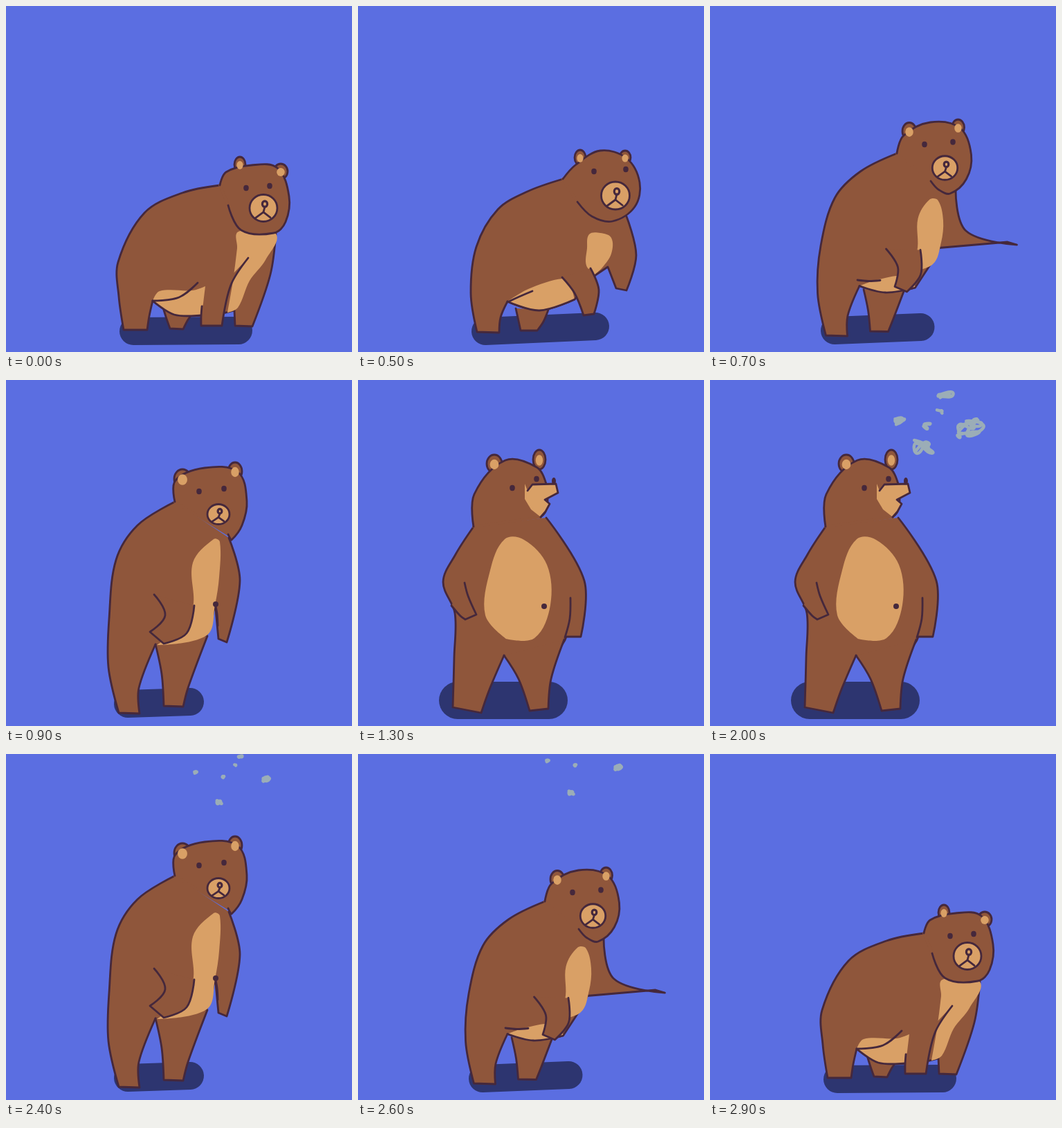
Animation, 500 px wide and 500 px high, one loop 3.4 s. Source, as an HTML page with a canvas:

```html
<!DOCTYPE html>
<html lang="en">
<head>
<meta charset="utf-8">
<title>Bear</title>
<style>
html, body { margin: 0; width: 100%; height: 100%; overflow: hidden; background: #5b6ee1; }
canvas { display: block; width: 100vw; height: 100vh; }
</style>
</head>
<body>
<canvas id="stage" width="500" height="500"></canvas>
<script>
const ctx = document.getElementById('stage').getContext('2d');
const LOOP = 3400, STEP = 100, MIRROR = 33;
const SKY = '#5b6ee1', FUR = '#8f563b', TAN = '#d9a066', INK = '#45283c', SHADE = '#2d3570', SMOKE = '#9badb7';

// Key points joined by smooth curves, except at these sharp ones.
const corners = { body: [5, 6, 8, 10, 11, 12, 13, 14], limb: [2, 3], chest: [5] };

const parse = pose => Object.fromEntries(Object.entries(pose).map(
  ([k, s]) => [k, s.split(' ').map(p => p.split(',').map(Number))]));

// Points are x,y; ears and muzzle are x,y,rx,ry; the shadow is a thick stroke x,y,width.
const crouch = parse({
  shadow: '184,470,40 336,469,40',
  body: '309,259 255,270 200,299 162,370 163,420 170,468 204,468 207,448 212,426 243,446 283,447 318,443 330,440 331,462 356,463 382,388 390,329',
  hind: '227,436 232,452 237,466 256,467 262,455 266,449',
  flank: '288,405 270,411 222,412',
  thigh: '212,426 250,421 277,400',
  chest: '336,326 389,328 375,367 352,397 335,436 320,443 328,397 334,350',
  arm: '283,434 282,448 282,462 312,462 325,403 350,364',
  head: '309,259 318,240 355,230 392,234 409,275 404,312 387,328 340,324 321,288',
  ears: '338,229,8,11 397,239,10,11',
  eyes: '347,263 381,260',
  muzzle: '372,292,20,19.5'
});
const lift = parse({
  shadow: '184,470,40 343,463,38',
  body: '296,250 245,268 202,294 171,348 163,415 172,471 204,472 206,450 216,427 262,440 313,424 343,389 361,377 373,408 388,411 402,360 388,304',
  hind: '228,437 232,455 235,469 259,469 268,456 275,439',
  flank: '308,403 296,394 246,409',
  thigh: '216,428 233,420 252,412',
  chest: '334,330 350,328 366,335 366,358 353,378 342,388 330,375 331,350',
  arm: '295,392 313,415 326,447 341,445 348,410 336,379',
  head: '296,250 314,230 350,209 388,220 407,255 400,290 368,311 338,304 317,283',
  ears: '321,219,8,11 386,219,8,10',
  eyes: '341,239 387,236',
  muzzle: '372,274,20.5,20'
});
const rise = parse({
  shadow: '176,468,40 266,465,40',
  body: '244,176 190,210 159,260 149,345 148,415 163,481 193,482 192,445 216,382 245,388 280,390 296,355 302,322 307,374 319,379 338,290 322,228',
  hind: '216,382 225,425 228,471 256,472 263,445 291,370',
  flank: '280,380 250,385 225,386',
  thigh: '210,364 225,375 240,381',
  chest: '300,230 309,234 308,285 302,325 290,369 218,383 268,335 270,264',
  arm: '214,310 230,340 208,364 228,381 261,366 272,326',
  head: '244,176 245,145 287,127 335,133 348,175 341,210 326,231 323,227 321,223',
  ears: '255,143,12,14 331,132,10,13',
  eyes: '279,161 315,157',
  muzzle: '307,194,16,14.5',
  sleeve: '302,322 305,338 306,355',
  navel: '303,324'
});
const stand = parse({
  shadow: '144,463,54 276,463,54',
  body: '167,212 141,252 123,292 140,337 139,400 137,473 178,481 190,447 211,398 230,404 280,408 289,392 299,376 301,371 322,371 327,290 272,199',
  hind: '211,398 232,432 248,478 275,475 279,432 298,375',
  chest: '212,230 240,231 273,267 278,325 255,373 214,374 184,340 191,275',
  arm: '154,293 159,312 171,339 155,346 148,341 135,326',
  head: '167,212 168,165 213,116 258,126 272,150 274,175 272,185 270,192 264,198',
  ears: '197,121,11,13 262,115,9,14',
  eyes: '223,156 258,143',
  muzzle: '262,166,22,18',
  sleeve: '307,315 306,345 299,372',
  navel: '269,327',
  snout: '245,160 252,151 286,150 289,163 270,173 277,179 271,190 264,198 250,187 241,172 241,150'
});

const lerp = (a, b, u) => a.map((v, i) => v + (b[i] - v) * u);

function morph(a, b, u) {
  const out = {};
  for (const k in { ...a, ...b }) {
    const p = a[k] ?? b[k], q = b[k] ?? a[k];
    out[k] = p.map((v, i) => lerp(v, q[i], u));
  }
  return out;
}

// The far paw swings forward on the way up.
function reach(pose, k) {
  const body = pose.body.map(([x, y], i) => i === 13 || i === 14 ? [x + 90 * k, y - 50 * k] : [x, y]);
  return { ...pose, body };
}

// The chest swells and the head lifts as the bear breathes in.
function inhale(pose, k) {
  const out = {};
  for (const key in pose) out[key] = key === 'shadow' ? pose[key] : pose[key].map(([x, y, ...r]) => {
    const swell = k * Math.exp(-(((y - 290) / 75) ** 2)) * (x < 220 ? 0.27 : 0.12);
    return [x + (x - 220) * swell, y - 21 * k * Math.max(0, 1 - (y - 100) / 330), ...r];
  });
  return out;
}

function poseAt(n) {
  if (n < 5) return crouch;
  if (n < 9) {
    const u = (n - 5) / 4;
    return reach(morph(lift, rise, u), Math.sin(u * Math.PI));
  }
  return n <= 13 ? morph(rise, stand, (n - 9) / 4) : inhale(stand, (n - 13) / 3);
}

// Smooth curve through points; a sharp point has no tangent.
function curve(pts, sharp = [], closed = false) {
  const n = pts.length, at = i => pts[(i + n) % n];
  const tangent = i => {
    i = (i + n) % n;
    if (sharp.includes(i) || (!closed && (i === 0 || i === n - 1))) return [0, 0];
    const dx = at(i + 1)[0] - at(i - 1)[0], dy = at(i + 1)[1] - at(i - 1)[1];
    const len = Math.hypot(dx, dy) || 1;
    return [dx / len, dy / len];
  };
  const path = new Path2D();
  path.moveTo(...pts[0]);
  for (let i = 0; i < (closed ? n : n - 1); i++) {
    const [x, y] = at(i), [u, v] = at(i + 1), d = Math.hypot(u - x, v - y) / 3;
    const p = tangent(i), q = tangent(i + 1);
    path.bezierCurveTo(x + p[0] * d, y + p[1] * d, u - q[0] * d, v - q[1] * d, u, v);
  }
  return path;
}

function polygon(pts) {
  const path = new Path2D();
  pts.forEach(p => path.lineTo(...p));
  return path;
}

function oval([x, y, rx, ry = rx]) {
  const path = new Path2D();
  path.ellipse(x, y, rx, ry, 0, 0, 2 * Math.PI);
  return path;
}

function fill(path, color) {
  ctx.fillStyle = color;
  ctx.fill(path);
}

function line(path, color = INK, width = 2.8) {
  ctx.strokeStyle = color;
  ctx.lineWidth = width;
  ctx.stroke(path);
}

function both(path, color) {
  fill(path, color);
  line(path);
}

function drawFace(p, side) {
  if (side) {
    fill(polygon(p.snout), TAN);
    line(polygon(p.snout.slice(0, 8)));
    const [x, y] = p.snout[2];
    fill(oval([x - 3, y - 4, 3, 5]), INK);
  } else {
    const [x, y, rx, ry] = p.muzzle[0];
    const lip = [x, y + ry * 0.3], nose = y - ry * 0.3;
    both(oval(p.muzzle[0]), TAN);
    line(oval([x + 2, nose, rx * 0.18, ry * 0.22]), INK, 3.2);
    line(polygon([[x + 2, nose + 4], lip, [x - rx * 0.6, y + ry * 0.75]]));
    line(polygon([lip, [x + rx * 0.5, y + ry * 0.7]]));
  }
  for (const [x, y] of p.eyes) fill(oval([x, y, 3.8, 4.2]), INK);
}

function drawBear(p, n) {
  const low = n < 9;
  line(polygon(p.shadow), SHADE, p.shadow[0][2]);
  both(curve(p.body, corners.body), FUR);
  both(curve(p.hind, corners.limb), FUR);
  if (low) {
    const hem = p.body.slice(8, 11);
    fill(curve([...hem, ...p.flank], [0, 2, 3], true), TAN);
    line(curve(hem));
    line(curve(p.thigh));
  }
  fill(curve(p.chest, corners.chest, true), TAN);
  both(curve(p.arm, corners.limb), FUR);
  if (!low) {
    line(curve(p.sleeve));
    fill(oval([...p.navel[0], 4]), INK);
  }
  for (const ear of p.ears) both(oval(ear), FUR);
  const head = curve(p.head);
  const join = polygon([p.head[0], p.head.at(-1)]);
  fill(head, FUR);
  line(join, FUR, 4);
  line(head);
  for (const [x, y, rx, ry] of p.ears) fill(oval([x, y + 1, rx * 0.58, ry * 0.55]), TAN);
  drawFace(p, n > 11);
}

// Smoke puffs at their fullest: x, y, width, height.
const puffs = [[274, 60, 15, 9], [308, 97, 27, 20], [314, 67, 13, 12], [331, 47, 12, 8], [338, 24, 28, 8], [376, 70, 38, 26]];

function random(seed) {
  return () => (seed = (seed * 16807) % 2147483647) / 2147483647;
}

function scribble(w, h, seed) {
  const rnd = random(seed * 7919 + 11);
  const count = Math.round(4 + w * h / 70);
  return Array.from({ length: count }, () => [(rnd() - 0.5) * w, (rnd() - 0.5) * h]);
}

function drawSmoke(step) {
  if (step < 17 || step > 28) return;
  const out = Math.min(1, (step - 16) / 4), drift = Math.max(0, (step - 20) / 4);
  const size = out * Math.max(0.25, 1 - 0.75 * drift);
  puffs.forEach(([px, py, w, h], i) => {
    const high = py + (py * py / 135 - py) * drift;
    const [x, y] = lerp([290, 140], [px, high], 1 - (1 - out) ** 2);
    if (y < 4) return;
    line(curve(scribble(w, h, i + 1).map(([a, b]) => [x + a * size, y + b * size])), SMOKE, 4.5);
  });
}

function frame(time) {
  const step = Math.floor(time % LOOP / STEP);
  const n = Math.min(step, MIRROR - step);
  ctx.lineCap = ctx.lineJoin = 'round';
  ctx.fillStyle = SKY;
  ctx.fillRect(0, 0, 500, 500);
  drawBear(poseAt(n), n);
  drawSmoke(step);
}

const start = performance.now();
function tick() {
  frame(performance.now() - start);
  requestAnimationFrame(tick);
}
tick();
</script>
</body>
</html>
```
